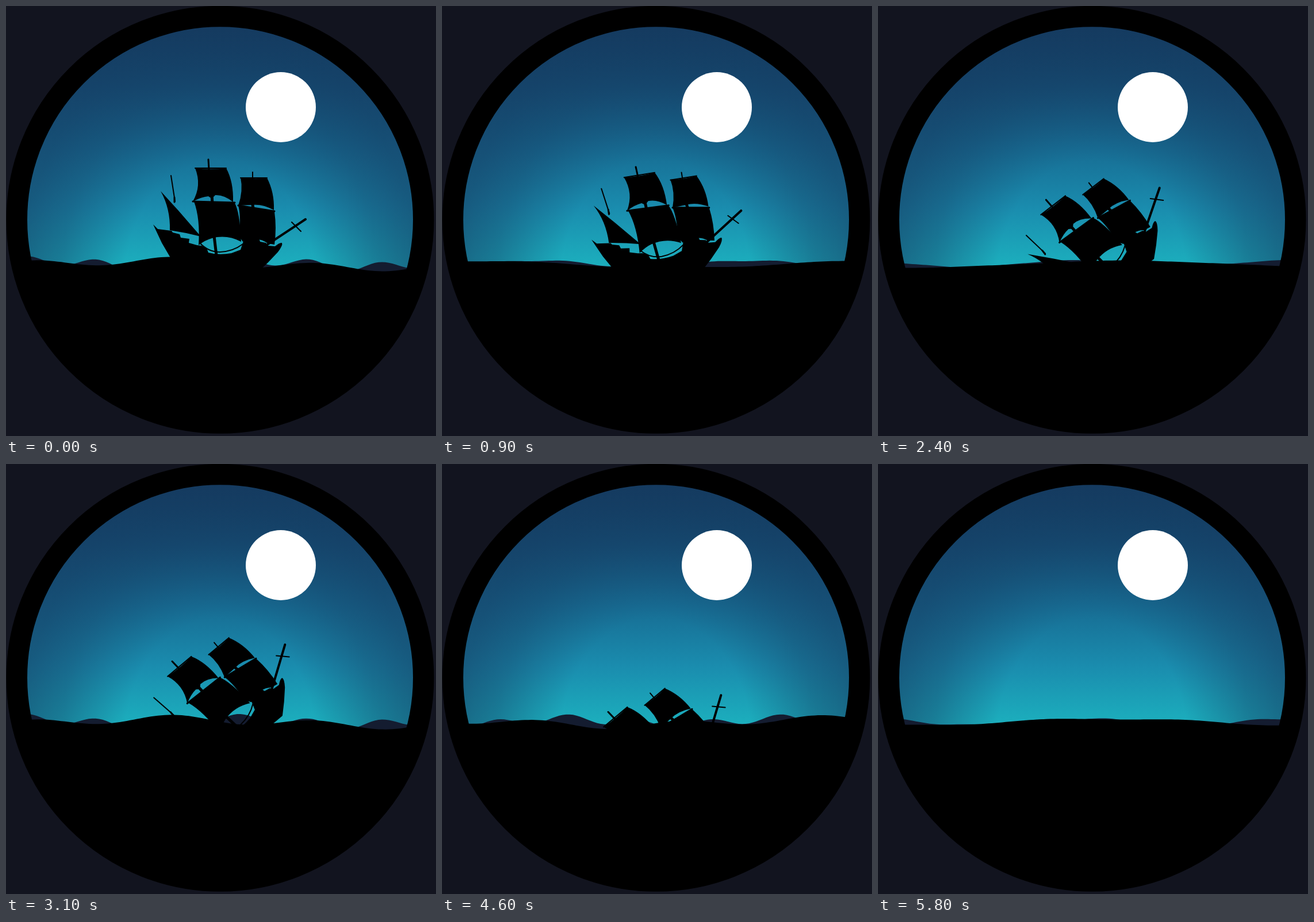
Animation of 748x748 px, one loop 5900 ms. Source, as an HTML page:

```html
<!DOCTYPE html>
<html lang="en">
<head>
<meta charset="utf-8">
<title>Sinking ship</title>
<style>
  html, body { margin: 0; width: 100%; height: 100%; overflow: hidden; background: #12141f; }
  svg { display: block; width: 100vw; height: 100vh; }
  .line { fill: none; stroke: #000; stroke-linecap: round; }
</style>
</head>
<body>
<svg viewBox="0 0 748 748">
  <defs>
    <linearGradient id="sky" gradientUnits="userSpaceOnUse" x1="0" y1="36" x2="0" y2="456">
      <stop offset="0" stop-color="#14385c"/>
      <stop offset=".25" stop-color="#154e75"/>
      <stop offset=".5" stop-color="#176c93"/>
      <stop offset=".75" stop-color="#1a8cae"/>
      <stop offset="1" stop-color="#1cb0be"/>
    </linearGradient>
    <radialGradient id="dusk" gradientUnits="userSpaceOnUse" cx="0" cy="0" r="1"
      gradientTransform="translate(372 480) scale(345 440)">
      <stop offset=".48" stop-color="#153c62" stop-opacity="0"/>
      <stop offset=".8" stop-color="#153c62" stop-opacity=".42"/>
      <stop offset="1" stop-color="#153c62" stop-opacity=".6"/>
    </radialGradient>
    <clipPath id="port"><circle cx="372.5" cy="372" r="354"/></clipPath>
  </defs>
  <rect width="748" height="748" fill="#12141f"/>
  <g clip-path="url(#port)">
    <rect width="748" height="748" fill="url(#sky)"/>
    <rect width="748" height="748" fill="url(#dusk)"/>
    <circle cx="478" cy="176" r="61" fill="#fff"/>
    <path id="back" fill="#141c30"/>
    <g id="ship">
      <!-- hull -->
      <path d="M256 380 L264 388 L288 391 L290 394 L302 397 L304 403 L319 405 L318 412
        L332 416 L340 417 L349 421 L352 429 Q370 434 392 430 L408 424 L413 409 L426 405
        L440 404 L442 410 L452 412 L456 417 L468 418 Q476 411 480 412 Q482 416 473 428
        L456 446 L438 463 L292 463 L285 436 L271 412 Z"/>
      <!-- mizzen sail -->
      <path d="M269 322 L300 356 L339 401 Q312 394 285 390 Q286 352 269 322 Z"/>
      <!-- main sails -->
      <path d="M329 282 Q356 285 383 282 Q396 306 395 341 Q379 328 364 329 L358 335 L352 331
        Q340 332 325 340 Q341 312 329 282 Z"/>
      <path d="M327 340 Q362 343 397 341 Q407 358 409 410 Q384 397 358 404 Q347 407 335 416
        Q338 370 327 340 Z"/>
      <!-- fore sails -->
      <path d="M408 298 Q431 302 454 299 Q467 324 466 355 Q446 344 428 346 L404 347
        Q413 322 408 298 Z"/>
      <path d="M404 347 Q435 350 467 358 Q471 386 467 415 L455 413 Q440 400 412 410
        L405 400 Q409 365 404 347 Z"/>
      <!-- masts, yards and spars -->
      <path class="line" stroke-width="2" d="M287 295 L294 340 M429 289 L429 302 M329 282 L383 282 M408 299 L454 299"/>
      <path class="line" stroke-width="3" d="M352 267 L353 284 M325 340 L398 342 M404 347 L467 357 M293 333 L293 341"/>
      <path class="line" stroke-width="5" d="M362 400 L366 434 M358 328 L359 344 M428 340 L430 352"/>
      <path class="line" stroke-width="4" d="M450 418 L521 371"/>
      <path class="line" stroke-width="2" d="M497 376 L513 392 M337 412 Q352 428 372 428 Q395 427 412 414"/>
    </g>
    <path id="front"/>
  </g>
  <circle cx="372.5" cy="371.75" r="353.75" fill="none" stroke="#000" stroke-width="36.5"/>
</svg>
<script>
const LOOP = 5900, STEP = 100;
const SWELL = 3250;   // one rise and fall of the sea
const WIDTH = 740;    // length of the longest wave
const TURN = 2 * Math.PI;

const byId = id => document.getElementById(id);
const ship = byId("ship"), front = byId("front"), back = byId("back");

// A cosine along x with its crest at the given place.
const wave = (x, crest, length, phase = 0) => Math.cos(TURN * (x - crest) / length + phase);

// Each surface is a long travelling wave with a short standing one on top.
const frontY = (x, a) =>
  449 - 6 * wave(x, 240, WIDTH, a) - 7 * wave(x, 290, WIDTH / 3) * Math.cos(a);
const backY = (x, a) =>
  448.5 - 6 * wave(x, 62, WIDTH / 2, -a) - 8 * wave(x, 158, WIDTH / 6) * Math.cos(a);

function surface(height, angle) {
  let d = "M0 748";
  for (let x = 0; x <= 748; x += 6) d += `L${x} ${height(x, angle).toFixed(2)}`;
  return d + "L748 748Z";
}

// Progress from 0 to 1, slow at both ends.
function ease(t, start, length) {
  const k = Math.min(Math.max((t - start) / length, 0), 1);
  return (1 - Math.cos(Math.PI * k)) / 2;
}

// The ship tips onto its stern, then goes under.
function shipPose(t) {
  const tip = ease(t, 0, 2850), sink = ease(t, 3050, 2850);
  return `translate(${6.5 * tip} ${61 * tip + 155 * sink}) rotate(${-40 * tip} 338 370)`;
}

function draw(now) {
  const t = Math.floor((now % LOOP) / STEP) * STEP;
  const angle = TURN * t / SWELL;
  front.setAttribute("d", surface(frontY, angle));
  back.setAttribute("d", surface(backY, angle));
  ship.setAttribute("transform", shipPose(t));
}

const start = performance.now();
function tick() {
  draw(performance.now() - start);
  requestAnimationFrame(tick);
}
tick();
</script>
</body>
</html>
```
